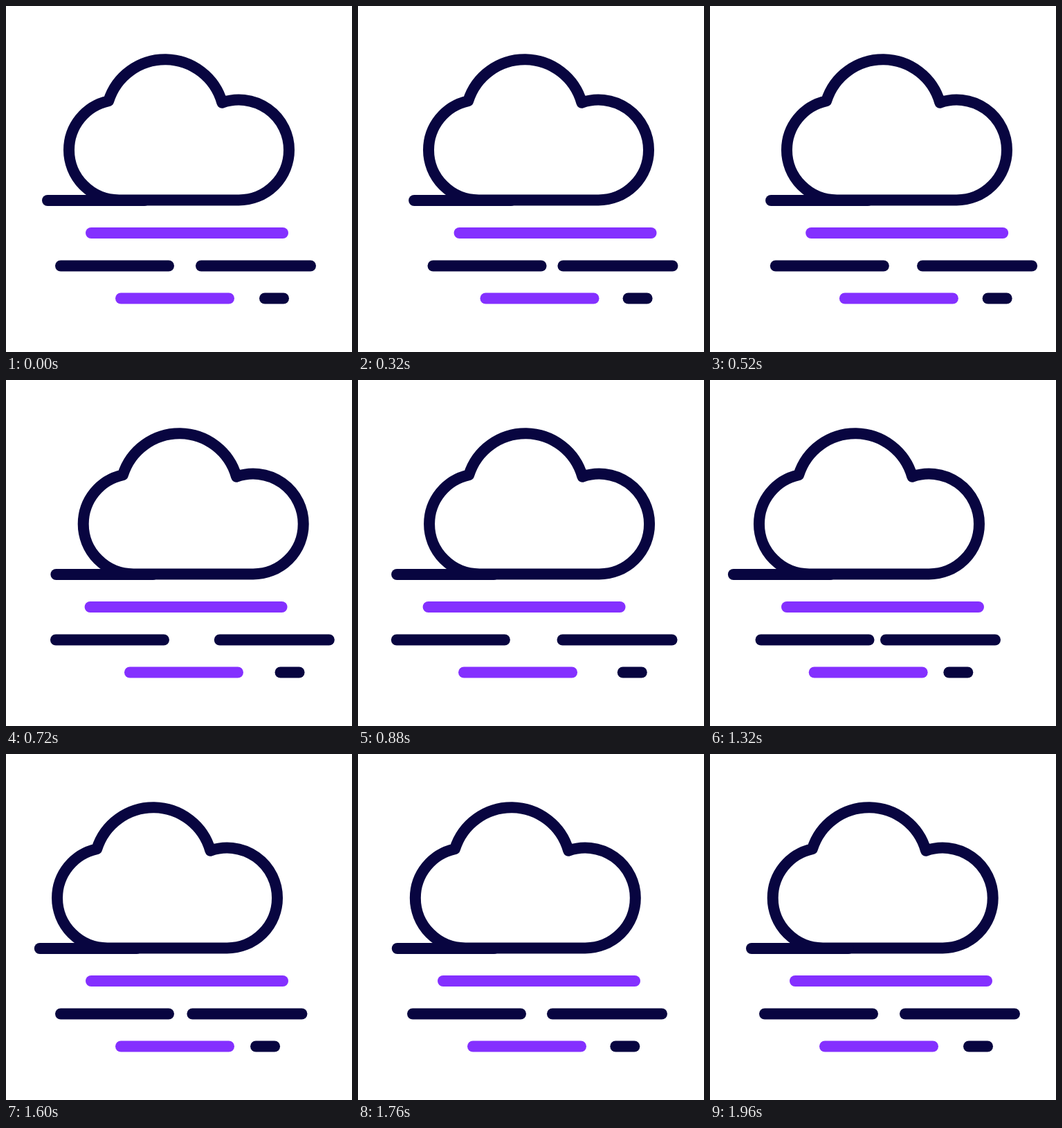
An HTML page that plays this animation: 500x500 px, repeating every 2 s.

```html
<!DOCTYPE html>
<html lang="en">
<head>
<meta charset="utf-8">
<title>Wind cloud</title>
<style>
  html, body { margin: 0; width: 100%; height: 100%; overflow: hidden; background: #fff; }
  svg { display: block; width: 100%; height: 100%; }
  path { fill: none; stroke-width: 16; stroke-linecap: round; stroke-linejoin: round; }
</style>
</head>
<body>
<svg id="stage" viewBox="0 0 500 500"></svg>
<script>
  const LOOP = 2000, STEP = 40;
  const NAVY = '#080540', PURPLE = '#8430ff';
  const stage = document.getElementById('stage');

  function addPath(d, color) {
    const path = document.createElementNS('http://www.w3.org/2000/svg', 'path');
    path.setAttribute('d', d);
    path.setAttribute('stroke', color);
    stage.append(path);
    return path;
  }

  const bar = (left, right, y, color) => addPath(`M${left} ${y}H${right}`, color);

  const cloud = addPath(
    'M163.5 280.5A72.5 72.5 0 0 1 91 208A72.5 72.5 0 0 1 148.2 137.2' +
    'A85.6 85.6 0 0 1 312.3 139.7' +
    'A72.5 72.5 0 0 1 409 208A72.5 72.5 0 0 1 336.5 280.5Z', NAVY);

  // Each part swings right until peak, left until dip, then home by rest.
  // soft: 1 is a full ease in and out, 0 is linear.
  const parts = [
    { path: cloud, swing: 22, peak: 640, dip: 1420, rest: 2000, soft: 1 },
    { path: bar(60, 200, 281, NAVY), swing: 30, peak: 480, dip: 1205, rest: 1860, soft: .5 },
    { path: bar(123, 400, 328, PURPLE), swing: 27.5, peak: 420, dip: 1000, rest: 1590, soft: 1 },
    { path: bar(79, 235, 375.5, NAVY), swing: 30, peak: 280, dip: 1040, rest: 1425, soft: 1 },
    { path: bar(282, 440, 375.5, NAVY), swing: 30, peak: 660, dip: 1360, rest: 1785, soft: .5 },
    { path: bar(166, 322, 422.5, PURPLE), swing: 29, peak: 540, dip: 1060, rest: 1600, soft: 1 },
    { path: bar(374, 401, 422.5, NAVY), swing: 30, peak: 590, dip: 1350, rest: 1800, soft: .5 }
  ];

  function ease(u, soft) {
    const smooth = u * u * (3 - 2 * u);
    return u + (smooth - u) * soft;
  }

  function offset({ swing, peak, dip, rest, soft }, t) {
    if (t < peak) return swing * ease(t / peak, soft);
    if (t < dip) return swing * (1 - 2 * ease((t - peak) / (dip - peak), soft));
    if (t < rest) return swing * (ease((t - dip) / (rest - dip), soft) - 1);
    return 0;
  }

  function draw(time) {
    const t = Math.floor((time % LOOP) / STEP) * STEP;
    for (const part of parts) {
      part.path.setAttribute('transform', `translate(${offset(part, t).toFixed(2)} 0)`);
    }
  }

  const start = performance.now();
  function tick() {
    draw(performance.now() - start);
    requestAnimationFrame(tick);
  }
  tick();
</script>
</body>
</html>
```
